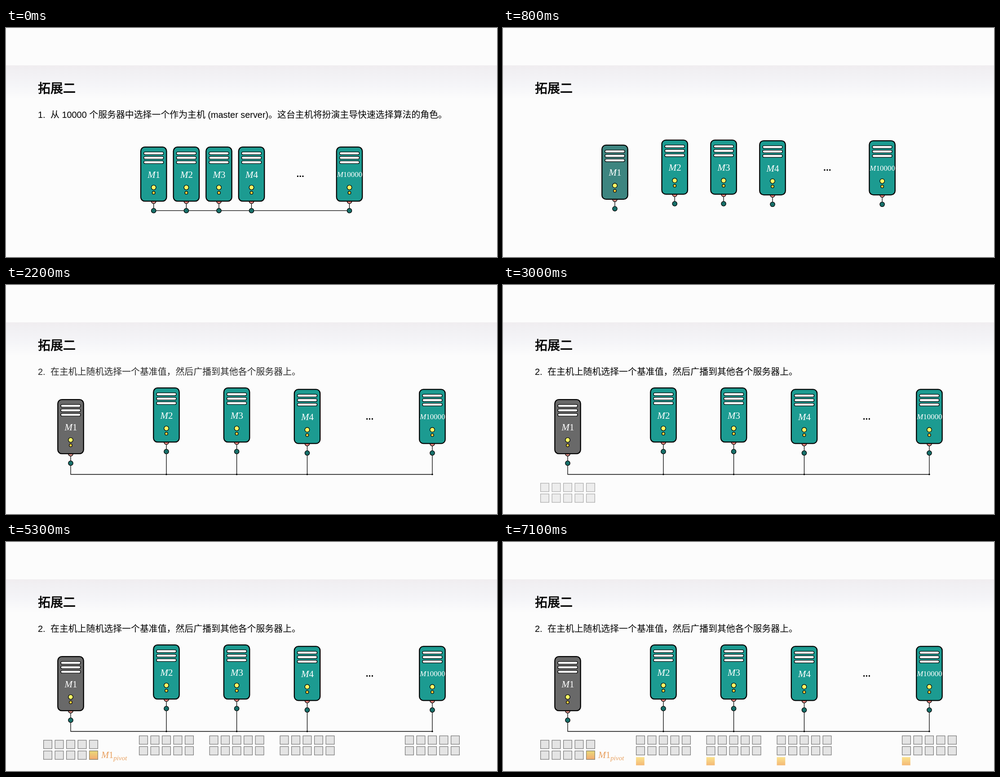
Animation, 1093 px wide and 512 px high, one loop 7.2 s. Source, as an HTML page:

```html
<!DOCTYPE html>
<html lang="zh-CN">
<head>
<meta charset="utf-8">
<title>拓展二</title>
<style>
html, body { margin: 0; width: 100%; height: 100%; overflow: hidden; background: #fcfcfc; }
svg { display: block; width: 100vw; height: 100vh; }
text { white-space: pre; }
.sans { font-family: "Liberation Sans", "Noto Sans CJK SC", "Noto Sans CJK", sans-serif; font-size: 19.9px; fill: #000; }
.title { font-family: "Noto Sans CJK SC", "Noto Sans CJK", sans-serif; font-size: 28px; stroke: #000; stroke-width: .8; }
.serif { font-family: "Liberation Serif", serif; }
.it { font-style: italic; }
.ink { stroke: #000; stroke-width: 1.3; }
.wire { stroke: #000; stroke-width: 1.3; fill: none; }
</style>
</head>
<body>
<svg id="stage" viewBox="0 0 1093 512" preserveAspectRatio="none">
  <defs>
    <linearGradient id="band" x1="0" y1="0" x2="0" y2="1">
      <stop offset="0" stop-color="#f0edf0"/>
      <stop offset=".2" stop-color="#f1f0f3"/>
      <stop offset=".6" stop-color="#f5f5f8"/>
      <stop offset="1" stop-color="#fcfcfc"/>
    </linearGradient>
    <linearGradient id="pivotFill" x1="0" y1="0" x2="0" y2="1">
      <stop offset="0" stop-color="#e9da78"/>
      <stop offset="1" stop-color="#f4ab72"/>
    </linearGradient>
    <linearGradient id="copyFill" x1="0" y1="0" x2="0" y2="1">
      <stop offset="0" stop-color="#fbe38e"/>
      <stop offset="1" stop-color="#f4b976"/>
    </linearGradient>
  </defs>
  <rect width="1093" height="512" fill="#fcfcfc"/>
  <rect y="83.5" width="1093" height="75" fill="url(#band)"/>
  <text class="sans title" x="71" y="145">拓展二</text>
</svg>
<script>
const LOOP = 7200;
const stage = document.getElementById('stage');

function add(parent, tag, attrs, text) {
  const el = document.createElementNS('http://www.w3.org/2000/svg', tag);
  for (const k in attrs) el.setAttribute(k, attrs[k]);
  if (text) el.textContent = text;
  parent.appendChild(el);
  return el;
}
const group = () => add(stage, 'g', {});
const lerp = (a, b, p) => a + (b - a) * p;
const ramp = (t, a, b) => Math.min(1, Math.max(0, (t - a) / (b - a)));
const ease = p => 0.5 - 0.5 * Math.cos(Math.PI * p);

// x and top before and after the move
const servers = [
  { id: '1', from: [328.7, 266.2], to: [144, 256.2] },
  { id: '2', from: [401.4, 266.2], to: [357, 230.2] },
  { id: '3', from: [474, 266.2], to: [513.6, 230.2] },
  { id: '4', from: [546.5, 266.2], to: [670.5, 233.4] },
  { id: '10000', from: [764.5, 266.2], to: [949, 233.4] }
];
const PLUG = 142.2;
const BUS = 423.5;
const TEAL = [28, 155, 145], GRAY = [105, 105, 105];

function step(label, body) {
  const g = group();
  add(g, 'text', { class: 'sans', x: 71, y: 201 }, label);
  add(g, 'text', { class: 'sans', x: 99, y: 201 }, body);
  return g;
}

function drawServer(s) {
  const g = s.node = group();
  const circle = (y, r, fill) => add(g, 'circle', { class: 'ink', cy: y, r, fill });
  circle(121.2, 5.2, s.id === '1' ? '#dd9088' : '#f28a84');
  add(g, 'path', { class: 'wire', d: `M0 126.5V${PLUG}` });
  circle(PLUG, 5.2, '#17706a');
  s.box = add(g, 'rect', { x: -28.7, width: 57.4, height: 121, rx: 9, fill: `rgb(${TEAL})`, stroke: '#000', 'stroke-width': 2.3 });
  for (const y of [14, 24, 34])
    add(g, 'rect', { class: 'ink', x: -22, y: y - 3, width: 44, height: 6, rx: 3, fill: '#fff' });
  const big = s.id.length > 1;
  const name = add(g, 'text', { class: 'serif', x: 0.5, y: big ? 67 : 68.5, 'font-size': big ? 17 : 21, 'text-anchor': 'middle', fill: '#fff' });
  add(name, 'tspan', { class: 'it' }, 'M');
  add(name, 'tspan', {}, s.id);
  circle(90.3, 5.2, '#ffff66');
  circle(102.2, 3.2, '#ffd23f');
}

function drawCells(g, x, y) {
  for (let i = 0; i < 10; i++)
    add(g, 'rect', {
      x: x + i % 5 * 25.5, y: y + Math.floor(i / 5) * 24,
      width: 18.8, height: 18.8, fill: '#e4e4e4', stroke: '#747474', 'stroke-width': 1.2
    });
}

const step1 = step('1.', '从 10000 个服务器中选择一个作为主机 (master server)。这台主机将扮演主导快速选择算法的角色。');
const step2 = step('2.', '在主机上随机选择一个基准值，然后广播到其他各个服务器上。');

const oldBus = group();
add(oldBus, 'path', { class: 'wire', d: 'M328.7 408.4H764.5' });

const newBus = group();
add(newBus, 'path', { class: 'wire', 'stroke-linejoin': 'round', d: `M144 398.4V${BUS}H949` });
for (const { to: [x, top] } of servers.slice(1)) {
  add(newBus, 'path', { class: 'wire', d: `M${x} ${top + PLUG}V${BUS}` });
  add(newBus, 'circle', { cx: x, cy: BUS, r: 1.7 });
}

servers.forEach(drawServer);
const dots = add(stage, 'text', { class: 'sans', 'text-anchor': 'middle', style: 'font-size:21px;font-weight:700' }, '...');

const hostCells = group(), otherCells = group(), pivot = group(), copies = group();
servers.forEach(({ to: [x] }, i) => {
  const left = x - 60.4;
  drawCells(i ? otherCells : hostCells, left, i ? 433.4 : 443.2);
  if (i) add(copies, 'rect', { x: left - 0.5, y: 481, width: 18.7, height: 18.3, fill: 'url(#copyFill)' });
});

add(pivot, 'rect', { x: 185.6, y: 467.2, width: 18.8, height: 18.8, fill: 'url(#pivotFill)', stroke: '#8a8268', 'stroke-width': 1.2 });
const tag = add(pivot, 'text', { class: 'serif', x: 212, y: 483, 'font-size': 20.5, fill: '#e8a05f' });
add(tag, 'tspan', { class: 'it' }, 'M');
add(tag, 'tspan', {}, '1');
add(tag, 'tspan', { class: 'it', dy: 4.5, 'font-size': 15 }, 'pivot');

const fade = (el, p) => el.setAttribute('opacity', p);
const place = (el, x, y) => el.setAttribute('transform', `translate(${x} ${y})`);

function render(t) {
  const move = ease(ramp(t, 550, 1100));
  for (const s of servers)
    place(s.node, lerp(s.from[0], s.to[0], move), lerp(s.from[1], s.to[1], move));
  servers[0].box.setAttribute('fill', `rgb(${TEAL.map((c, i) => Math.round(lerp(c, GRAY[i], move)))})`);
  place(dots, lerp(655.2, 809.5, move), lerp(333, 301, move));

  fade(step1, 1 - ramp(t, 350, 750));
  fade(oldBus, 1 - ramp(t, 350, 750));
  fade(newBus, ramp(t, 1200, 1600));
  fade(step2, ramp(t, 1700, 2300));
  fade(hostCells, ramp(t, 2600, 3250));
  fade(otherCells, ramp(t, 3150, 3800));
  fade(pivot, ramp(t, 4400, 5050));
  fade(copies, ramp(t, 6450, 7100));
}

const start = performance.now();
function tick() {
  render((performance.now() - start) % LOOP);
  requestAnimationFrame(tick);
}
render(0);
requestAnimationFrame(tick);
</script>
</body>
</html>
```
